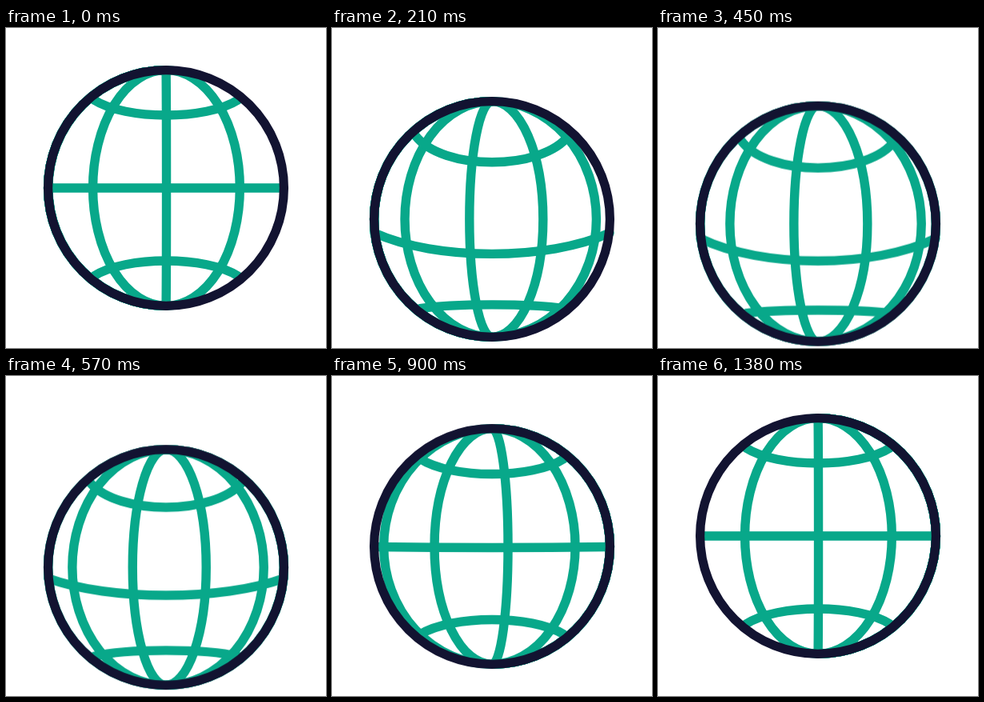
An HTML page without scripts that plays this animation: 400 px wide and 400 px high, repeating every 3.41 s.

```html
<!DOCTYPE html>
<html lang="en">
<head>
<meta charset="utf-8">
<title>Spinning globe</title>
<style>
  @property --turn { syntax: "<number>"; inherits: true; initial-value: 0; }

  html, body { margin: 0; height: 100%; overflow: hidden; background: #fff; }
  svg { display: block; width: 100vw; height: 100vh; fill: none; }

  .globe, .lines, .lat { animation: 3410ms infinite both; }
  .globe { animation-name: drop; }
  .lines {
    animation-name: spin;
    stroke: #08a88a;
    stroke-width: 11.4;
    stroke-linecap: round;
  }
  .ring { stroke: #121331; stroke-width: 11.2; }

  /* Meridians slide from slot to slot: rim, side, centre, side, rim. */
  .lon path {
    d: path("M0 -147.4A147.4 147.4 0 0 1 0 147.4");
    vector-effect: non-scaling-stroke;
    --q: (var(--turn) + var(--k) + .006);
    transform: scaleX(calc((92 * clamp(-1, var(--q), 1)
      + 55.4 * (clamp(0, var(--q) - 1, 1) - clamp(0, -1 * var(--q) - 1, 1))) / 147.4));
  }

  .north { animation-name: north; }
  .equator { animation-name: equator; }
  .south { animation-name: south; }

  @keyframes drop {
    0% { transform: translateY(0); animation-timing-function: cubic-bezier(.333, 0, .33, 1); }
    10.117% { transform: translateY(46px); animation-timing-function: cubic-bezier(.36, 0, .4, 1); }
    40.47%, 100% { transform: translateY(0); }
  }
  @keyframes spin {
    0%, 1.906% { --turn: 0; animation-timing-function: cubic-bezier(.156, 0, .382, 1); }
    40.47%, 100% { --turn: 6; }
  }

  /* Parallels bend down with the drop, then straighten. */
  @keyframes north {
    0% { d: path("M-90 -110C-50 -84.7 50 -84.7 90 -110"); animation-timing-function: cubic-bezier(.333, 0, .3, 1); }
    10.117% { d: path("M-97 -104C-65 -56 65 -56 97 -104"); animation-timing-function: cubic-bezier(.333, 0, .667, 1); }
    28.15%, 100% { d: path("M-90 -110C-50 -84.7 50 -84.7 90 -110"); }
  }
  @keyframes equator {
    0% { d: path("M-147 0C-70 0 70 0 147 0"); animation-timing-function: cubic-bezier(.333, 0, .3, 1); }
    10.117% { d: path("M-147 20C-70 60.7 70 60.7 147 20"); animation-timing-function: cubic-bezier(.333, 0, .667, 1); }
    28.15%, 100% { d: path("M-147 0C-70 0 70 0 147 0"); }
  }
  @keyframes south {
    0% { d: path("M-90 110C-50 84.7 50 84.7 90 110"); animation-timing-function: cubic-bezier(.333, 0, .3, 1); }
    10.117% { d: path("M-90 112C-50 108.7 50 108.7 90 112"); animation-timing-function: cubic-bezier(.333, 0, .667, 1); }
    28.15%, 100% { d: path("M-90 110C-50 84.7 50 84.7 90 110"); }
  }
</style>
</head>
<body>
<svg viewBox="0 0 400 400">
  <g transform="translate(200 200)">
    <g class="globe">
      <g class="lines">
        <g class="lon">
          <path style="--k:-7"/>
          <path style="--k:-6"/>
          <path style="--k:-5"/>
          <path style="--k:-4"/>
          <path style="--k:-3"/>
          <path style="--k:-2"/>
          <path style="--k:-1"/>
          <path style="--k:0"/>
          <path style="--k:1"/>
        </g>
        <path class="lat north"/>
        <path class="lat equator"/>
        <path class="lat south"/>
      </g>
      <circle class="ring" r="147.4"/>
    </g>
  </g>
</svg>
</body>
</html>
```
